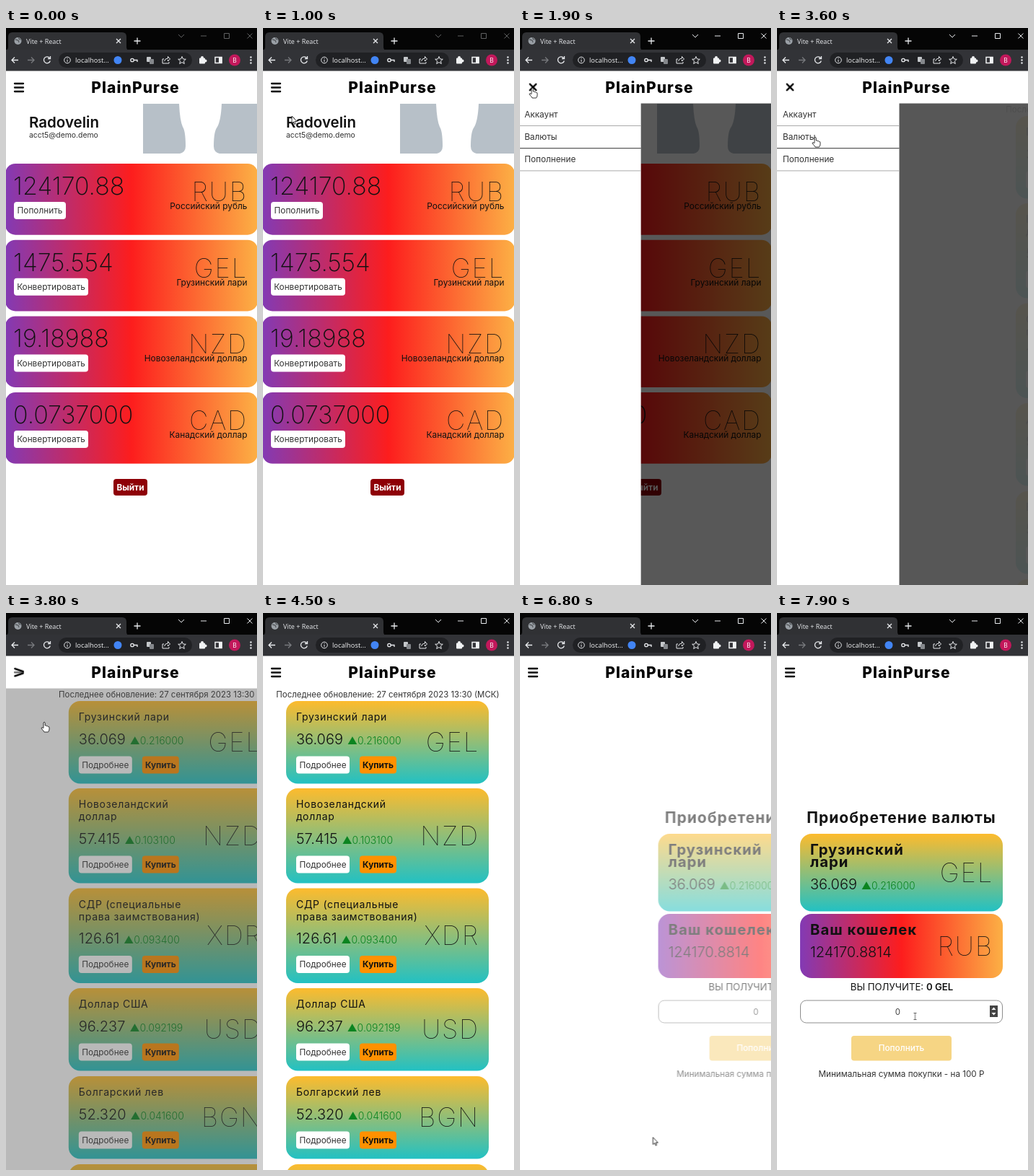
An HTML page that plays this animation: 348 by 772 pixels, repeating every 8000 ms.

```html
<!DOCTYPE html>
<html lang="ru">
<head>
<meta charset="utf-8">
<title>PlainPurse</title>
<style>
  html, body { margin: 0; width: 100%; height: 100%; overflow: hidden; background: #fff; }
  svg { display: block; width: 100vw; height: 100vh; font-family: Inter, "Noto Sans", sans-serif; }
  .ui { font-family: "Open Sans", "Noto Sans", sans-serif; }
  .airy { letter-spacing: .05em; }
  .line { fill: none; stroke: #e8eaed; stroke-width: 1.3; }
  .title { filter: drop-shadow(2px 3px 4px rgba(0, 0, 0, .55)); }
</style>
</head>
<body>
<svg id="stage" viewBox="0 0 348 772" preserveAspectRatio="none"></svg>
<script>
const LOOP = 8000;
const GREEN = '#0b8420';

const rect = (x, y, w, h, fill, r = 0, extra = '') =>
  `<rect x="${x}" y="${y}" width="${w}" height="${h}" rx="${r}" fill="${fill}" ${extra}/>`;
const text = (x, y, size, str, { w = 400, fill = '#111', at = 'start', cls = '' } = {}) =>
  `<text x="${x}" y="${y}" font-size="${size}" font-weight="${w}" fill="${fill}" text-anchor="${at}" class="${cls}">${str}</text>`;
const heading = (x, y, size, str, opts) => text(x, y, size, str, { cls: 'airy', ...opts });
const path = (d, extra = '') => `<path d="${d}" class="line" ${extra}/>`;
const group = (id, body, extra = '') => `<g id="${id}" ${extra}>${body}</g>`;
const code = (x, y, str) => heading(x, y, 36.5, str, { w: 100, at: 'end' });
const rate = (x, y, value, delta) => text(x, y, 20,
  `${value}<tspan dx="6" font-size="14" fill="${GREEN}">▲${delta}</tspan>`, { w: 300 });
const button = (x, y, w, h, label, fill, opts) =>
  rect(x, y, w, h, fill, 4) + text(x + w / 2, y + h / 2 + 4.2, 11.8, label, { at: 'middle', fill: '#333', ...opts });

const defs = `<defs>
  <linearGradient id="wallet"><stop stop-color="#833ab4"/><stop offset=".5" stop-color="#fd1d1d"/><stop offset="1" stop-color="#fcb045"/></linearGradient>
  <linearGradient id="quote" x2="0" y2="1"><stop stop-color="#fdbb2d"/><stop offset="1" stop-color="#22c1c3"/></linearGradient>
  <radialGradient id="haze" gradientUnits="userSpaceOnUse" cx="174" cy="438" r="377"><stop stop-color="#eeaeca"/><stop offset="1" stop-color="#94bbe9"/></radialGradient>
</defs>`;

function browser() {
  const controls = path('M239 9l4 4 4-4M270 11h8M302.500 7.500h7v7h-7zM334.500 7.500l7 7m0-7l-7 7', 'style="stroke-width:1"');
  return rect(0, 0, 348, 31, '#050505') +
    '<path d="M0 31Q3 30 3 26V12Q3 6 9 6H161Q167 6 167 12V26Q167 31 171 31Z" fill="#303134"/>' +
    rect(0, 30, 348, 29.5, '#323337') +
    '<circle cx="16.500" cy="18" r="5" fill="#9aa0a6"/>' +
    path('M13 16l4 1 1 3M17 13.500l3 3', 'style="stroke:#55585c"') +
    text(28, 21.5, 9, 'Vite + React', { fill: '#e8eaed', cls: 'ui' }) +
    path('M153 15l6 6m0-6l-6 6M182 13.500v9m-4.500-4.500h9') +
    group('controls', controls) +
    path('M17 44.500H8m4-4l-4 4 4 4') +
    path('M30 44.500h9m-4-4l4 4-4 4', 'style="stroke:#77797d"') +
    path('M60.500 41.500a4.500 4.500 0 1 0 .8 4M61.500 39v3.500h-3.500') +
    rect(73, 34, 185, 21, '#202124', 10.5) +
    '<circle cx="85" cy="44.500" r="4.300" class="line" style="stroke-width:1"/>' +
    path('M85 44v3m0-5v1', 'style="stroke-width:1"') +
    text(96, 48, 9.4, 'localhost...', { fill: '#f1f3f4', cls: 'ui' }) +
    '<circle cx="155" cy="44.500" r="5.500" fill="#4285f4"/>' +
    '<circle cx="175" cy="44.500" r="2.200" class="line"/>' + path('M177 44.500h5v2.500') +
    rect(195, 40, 6, 7, '#c4c7ca', 1) + rect(199, 43, 6, 7, '#84878b', 1) +
    path('M219 43h-2v6h9v-2M219.500 46q1-4 5-4v-2.500l3 3.500-3 3v-2', 'style="stroke-width:1"') +
    path('M244 39.500l1.500 3.500 3.800.3-2.900 2.500.9 3.700-3.300-2-3.300 2 .9-3.700-2.900-2.500 3.800-.3z', 'style="stroke-width:1"') +
    rect(268, 41.5, 8, 8, '#f1f3f4', 1) + '<circle cx="272" cy="41" r="2" fill="#f1f3f4"/><circle cx="276.500" cy="45.500" r="2" fill="#f1f3f4"/>' +
    rect(290, 40.5, 9, 8, 'none', 0, 'stroke="#f1f3f4" stroke-width="1.500"') + rect(295, 40, 4.5, 9, '#f1f3f4') +
    '<circle cx="317" cy="44.500" r="8" fill="#c2185b"/>' +
    text(317, 47.5, 8.5, 'B', { fill: '#fff', at: 'middle', cls: 'ui' }) +
    [40.5, 44.5, 48.5].map(y => `<circle cx="339.500" cy="${y}" r="1.200" fill="#e8eaed"/>`).join('');
}

function header() {
  const bar = id => group(id, path('M-6 0H6', 'style="stroke:#000;stroke-width:2.300;stroke-linecap:round"'));
  return rect(0, 59.5, 348, 45, '#fff') +
    heading(179.5, 89.5, 21, 'PlainPurse', { w: 800, at: 'middle', fill: '#000' }) +
    ['barTop', 'barMid', 'barLow'].map(bar).join('');
}

function account() {
  const wallets = [
    ['124170.88', 'Пополнить', 72, 'RUB', 'Российский рубль'],
    ['1475.554', 'Конвертировать', 103, 'GEL', 'Грузинский лари'],
    ['19.18988', 'Конвертировать', 103, 'NZD', 'Новозеландский доллар'],
    ['0.0737000', 'Конвертировать', 103, 'CAD', 'Канадский доллар'],
  ];
  return text(32, 138, 20.5, 'Radovelin', { w: 600 }) +
    text(32, 152, 10.4, 'acct5@demo.demo', { fill: '#333' }) +
    rect(190, 105, 158, 69, '#b7c0c8') +
    '<path d="M240 105Q241 128 245 137Q249 143 249 164Q249 172 241 174H296Q288 172 288 164Q288 143 293 137Q298 128 299 105Z" fill="#fff"/>' +
    wallets.map(([sum, action, w, cur, name], i) => {
      const y = 188 + i * 105.7;
      return rect(-1, y, 350, 98.7, 'url(#wallet)', 14) +
        text(10, y + 43, 34, sum, { w: 200 }) +
        button(11, y + 53, w, 24, action, '#fff') +
        code(335, y + 52, cur) +
        text(334.5, y + 63, 11.9, name, { at: 'end' });
    }).join('') +
    button(149, 625, 47, 23, 'Выйти', '#8e0006', { w: 700, fill: '#fff' });
}

function list() {
  const quotes = [
    [122, ['Грузинский лари'], '36.069', '0.216000', 'GEL'],
    [243, ['Новозеландский', 'доллар'], '57.415', '0.103100', 'NZD'],
    [381.5, ['СДР (специальные', 'права заимствования)'], '126.61', '0.093400', 'XDR'],
    [520, ['Доллар США'], '96.237', '0.092199', 'USD'],
    [642, ['Болгарский лев'], '52.320', '0.041600', 'BGN'],
  ];
  return text(173, 117, 11.45, 'Последнее обновление: 27 сентября 2023 13:30 (МСК)', { at: 'middle', fill: '#333' }) +
    quotes.map(([y, name, value, delta, cur]) => {
      const h = 97.5 + 17 * name.length, end = y + h;
      return rect(32, y, 281, h, 'url(#quote)', 16) +
        name.map((s, i) => heading(46, y + 27 + 17 * i, 14, s)).join('') +
        rate(46, end - 55, value, delta) +
        button(46, end - 38, 74, 24, 'Подробнее', '#fff') +
        button(134, end - 38, 51, 24, 'Купить', '#ff9100', { w: 700, fill: '#111' }) +
        code(300, y + h / 2 + 13, cur);
    }).join('') +
    rect(32, 764, 281, 114, 'url(#quote)', 16);
}

function detail() {
  const tops = [176, 192, 255, 258, 246, 244, 240, 249, 247, 225, 219, 213, 207, 206, 198, 178,
    175, 167, 171, 200, 236, 210, 209, 206, 203, 214, 210, 246, 256, 249, 237];
  const bars = tops.map((y, i) => {
    const x = 32.2 + i * 9.35;
    const tone = y > (tops[i - 1] || 0) ? '#f01818' : '#16751c';
    return path(`M${x} ${y}V349`, 'style="stroke:#111;stroke-width:.8"') +
      rect(x - 3.5, y - 3.5, 7, 7, '#000') + rect(x - 2, y - 2, 4, 4, tone);
  }).join('');
  const dates = ['16.08', '23.08', '30.08', '06.09', '13.09', '20.09', '27.09'];
  return rect(0, 104, 348, 668, 'url(#haze)') +
    rect(0, 104, 348, 267, '#fff', 0, 'opacity=".68"') +
    rect(50, 118.5, 75, 30.5, '#000', 12) + text(87.5, 138, 11.7, 'За неделю', { fill: '#fff', at: 'middle' }) +
    rect(229, 118.5, 67, 30.5, '#fff', 12) + text(262.5, 138, 11.7, 'За месяц', { fill: '#666', at: 'middle' }) +
    [37, 36, 35].map((n, i) => text(0, 175 + i * 61.5, 11.5, n, { fill: '#555' })).join('') +
    path('M29 350H316', 'style="stroke:#aaa3ac"') + bars +
    dates.map((d, i) => text(37 + i * 45, 361, 6.3, d, { at: 'middle', fill: '#555' })).join('') +
    rect(0, 371.5, 348, 41.5, '#000') +
    text(99, 398, 14, '8 сентября 2023', { at: 'middle', fill: '#fff' }) +
    text(243, 397, 11.2, '37.382 GEL', { w: 700, fill: '#fff' }) +
    text(244, 404, 8.2, '▲0.1496 GEL', { w: 600, fill: '#1b641d' }) +
    `<g class="title">${['ГРУЗИНСКИЙ', 'ЛАРИ'].map((s, i) => heading(16, 446 + 24 * i, 34, s, { w: 600, fill: '#fff' })).join('')}</g>` +
    rect(252, 452, 90, 91, '#fff', 14) +
    text(259, 488.5, 20.5, '36.069', { w: 500 }) +
    text(260, 513, 14, '▲0.216000', { w: 600, fill: '#26792b' }) +
    heading(-4, 661, 133, 'GEL', { w: 100, fill: '#fff' }).replace('<text', '<text style="letter-spacing:.1em"') +
    rect(0, 729, 348, 43, '#ffb000') +
    heading(173, 757, 17.8, 'Приобрести', { w: 500, fill: '#fff', at: 'middle' });
}

function purchase() {
  return heading(172.5, 291, 21, 'Приобретение валюты', { w: 700, at: 'middle' }) +
    rect(32, 306, 281, 107.5, 'url(#quote)', 16) +
    ['Грузинский', 'лари'].map((s, i) => heading(46, 335 + 17 * i, 20.3, s, { w: 700 })).join('') +
    rate(46, 383, '36.069', '0.216000') + code(300, 373, 'GEL') +
    rect(32, 417, 281, 89, 'url(#wallet)', 16) +
    heading(46, 446, 20.3, 'Ваш кошелек', { w: 700 }) +
    text(46, 477, 20, '124170.8814', { w: 300 }) + code(300, 475, 'RUB') +
    text(173, 522.5, 13.2, 'ВЫ ПОЛУЧИТЕ: <tspan font-weight="600">0 GEL</tspan>', { at: 'middle' }) +
    rect(32.5, 537, 280, 31, '#fff', 8, 'stroke="#8d8d8d"') +
    text(167.5, 556.5, 11.5, '0', { at: 'middle', fill: '#444' }) +
    group('spinner', rect(295, 544, 11, 16, '#444') +
      '<path d="M297.500 550l3-3.500 3 3.500zM297.500 554l3 3.500 3-3.500z" fill="#fff"/>') +
    button(103, 586, 139, 34.5, 'Пополнить', '#f6d584', { w: 500, fill: '#fff' }) +
    text(172.5, 643, 11.7, 'Минимальная сумма покупки - на 100 Р', { at: 'middle', fill: '#333' });
}

function drawer() {
  return rect(0, 104, 169.5, 668, '#fff') +
    ['Аккаунт', 'Валюты', 'Пополнение'].map((s, i) =>
      text(8, 124 + 31.2 * i, 11.8, s, { fill: '#333' }) +
      rect(0, 135 + 31.2 * i, 169.5, 1, i === 1 ? '#333' : '#aaa')).join('');
}

const pointer = 'fill="#fff" stroke="#222" stroke-width=".9" stroke-linejoin="round"';
const cursors =
  group('hand', `<path d="M-1 8V1Q0-1 1.200 1V5Q3 4 3.500 6Q5 5 5.500 6.500Q7 6 7 8V10Q7 12 5.500 14H0Q-1 12-4 9Q-4 7-2 8L-1 9" ${pointer}/>`) +
  group('arrow', `<path d="M0 0V10L2.300 8 3.800 11.500 5.300 10.800 3.900 7.500H7Z" ${pointer}/>`) +
  group('beam', '<path d="M-2-4.500H2M-2 4.500H2M0-4.500V4.500" fill="none" stroke="#555" stroke-width=".9"/>');

const stage = document.getElementById('stage');
stage.innerHTML = defs + rect(0, 0, 348, 772, '#fff') +
  group('account', account()) + group('list', list()) + group('detail', detail()) + group('purchase', purchase()) +
  rect(0, 104, 348, 668, '#000', 0, 'id="shade"') + group('drawer', drawer()) +
  header() + browser() + group('cursor', cursors);

// Steps are [ms, properties, easing towards the next step]; the ends are held.
function track(id, steps) {
  const first = steps[0], last = steps.at(-1);
  const held = [...steps];
  if (first[0] > 0) held.unshift([0, first[1]]);
  if (last[0] < LOOP) held.push([LOOP, last[1]]);
  document.getElementById(id).animate(
    held.map(([ms, props, easing = 'linear']) => ({ offset: ms / LOOP, easing, ...props })),
    { duration: LOOP, iterations: Infinity });
}
const move = (x, y = 0) => `translate(${x}px, ${y}px)`;

// Visible from the first time to the second, from the third to the fourth, and so on.
function show(id, ...times) {
  const steps = times.map((ms, i) => [ms, { opacity: i % 2 ? 0 : 1 }, 'step-end']);
  if (times[0] > 0) steps.unshift([0, { opacity: 0 }, 'step-end']);
  track(id, steps);
}

function enter(id, from, to) {
  const away = { opacity: 0, transform: move(348) };
  const home = { opacity: 1, transform: move(0) };
  track(id, [[from, away, 'ease'], [from + 480, home], [to, home, 'step-end'], [to, away]]);
}

// The menu eases open, waits, and eases shut.
function toggle(id, closed, open) {
  track(id, [[1630, closed, 'ease'], [1930, open], [3700, open, 'ease'], [4000, closed]]);
}

show('account', 0, 3520);
enter('list', 3540, 5300);
enter('detail', 5300, 6650);
enter('purchase', 6650, LOOP);
show('spinner', 7500, LOOP);
track('controls', [[0, { opacity: .4 }, 'step-end'], [1600, { opacity: 1 }]]);

toggle('shade', { opacity: 0 }, { opacity: .66 });
toggle('drawer', { transform: move(-348) }, { transform: move(0) });
const pose = (y, turn) => ({ transform: `${move(18, y)} rotate(${turn}deg)` });
toggle('barTop', pose(77, 0), pose(82, 45));
toggle('barMid', { opacity: 1, ...pose(82.5, 0) }, { opacity: 0, ...pose(82, 0) });
toggle('barLow', pose(88, 0), pose(82, -45));

track('cursor', [
  [200, 362, 420], [1000, 40, 122], [1400, 40, 122], [1600, 17, 83], [2250, 17, 83],
  [3000, 53, 151], [4600, 53, 151], [5150, 85, 211], [5400, 85, 211], [5900, 204, 496],
  [6150, 204, 496], [6500, 180, 751], [6700, 180, 751], [7050, 205, 610], [7600, 191.5, 559],
].map(([ms, x, y]) => [ms, { transform: move(x, y) }, 'ease-in-out']));
show('hand', 1550, 4000, 5050, 5400, 6430, 6750);
show('arrow', 0, 1550, 4600, 5050, 5400, 6430, 6750, 7500);
show('beam', 7500, LOOP);
</script>
</body>
</html>
```
